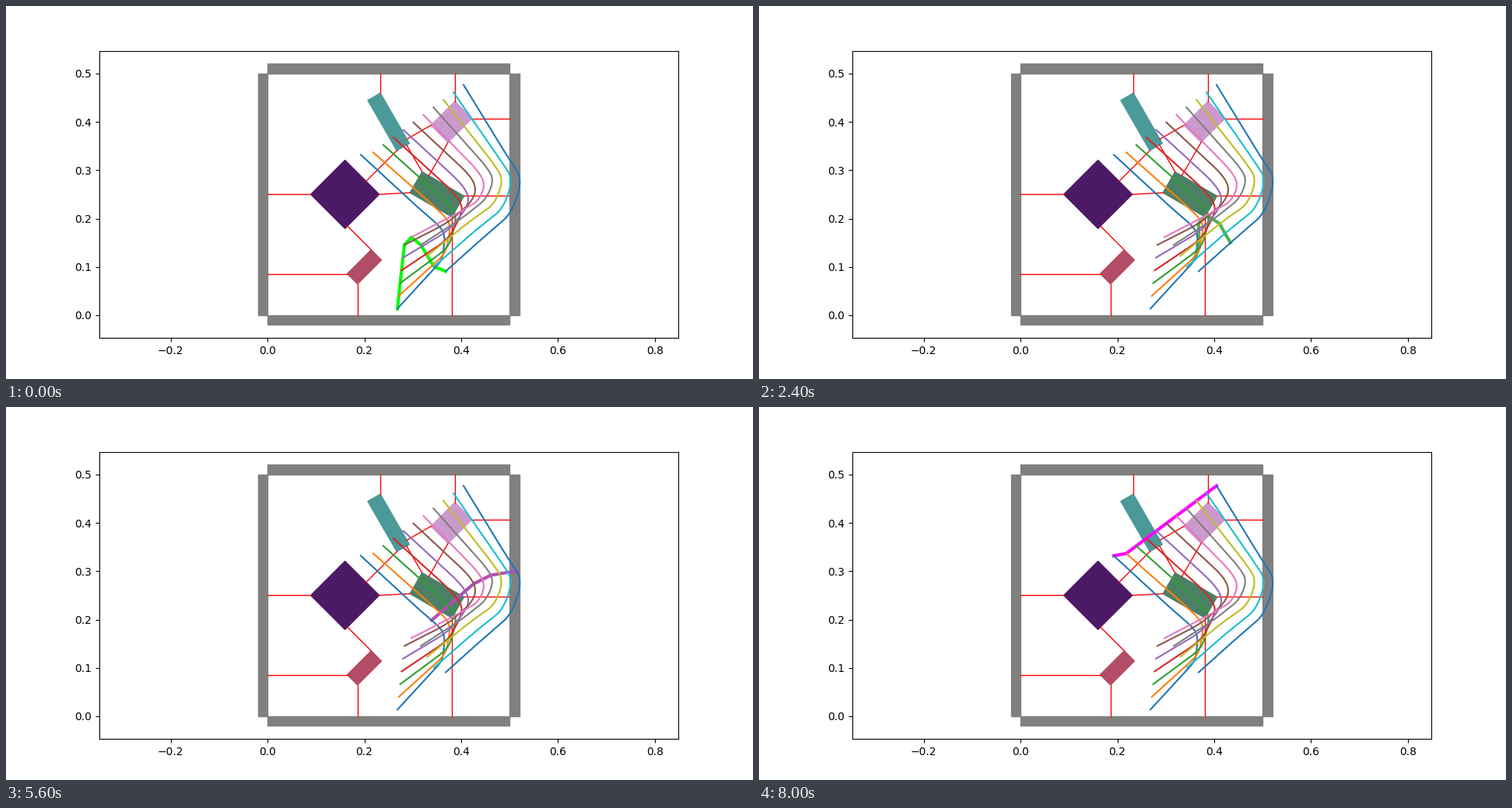
These frames come from a looping animation (960x480 px, 8.2 s). A matplotlib script:

```python
from itertools import product

import numpy as np
import matplotlib.pyplot as plt
from matplotlib.animation import FuncAnimation
from matplotlib.patches import Polygon

FRAMES, INTERVAL = 41, 200
SCALE = 369.6 / 0.594       # pixels per data unit
X0, Y0 = 336.1, 397.5       # pixel position of the data origin
CENTER = (480 + 12 - X0) / SCALE
KNOTS = np.array([0, 0, 0, .2, .4, .5, .6, .7, .8, 1, 1, 1])

# name: centre x, y, width, height, angle, colour
BLOCKS = {
    "top": (0.25, 0.51, 0.5, 0.02, 0, "gray"),
    "bottom": (0.25, -0.01, 0.5, 0.02, 0, "gray"),
    "left": (-0.01, 0.25, 0.02, 0.5, 0, "gray"),
    "right": (0.51, 0.25, 0.02, 0.5, 0, "gray"),
    "purple": (0.16, 0.25, 0.1, 0.1, 45, "#4c1966"),
    "teal": (0.25, 0.4, 0.03, 0.12, 30, "#4c9999"),
    "pink": (0.38, 0.4, 0.07, 0.05, 45, "#cc99cc"),
    "green": (0.35, 0.25, 0.1, 0.05, -30, "#4c8066"),
    "crimson": (0.2, 0.1, 0.07, 0.03, 45, "#b34c66"),
}
NEIGHBOURS = {
    "purple": "left teal green crimson",
    "teal": "top pink green",
    "pink": "top right green",
    "green": "right bottom",
    "crimson": "left bottom",
}


def corners(cx, cy, w, h, angle, _):
    a = np.radians(angle)
    u = np.array([np.cos(a), np.sin(a)]) * w / 2
    v = np.array([-np.sin(a), np.cos(a)]) * h / 2
    return np.array([cx, cy]) + [u + v, v - u, -u - v, u - v]


def shortest_link(a, b):
    """Shortest segment from a corner of one block to an edge of the other."""
    links = []
    for p, q in ((a, b), (b, a)):
        for corner, k in product(p, range(4)):
            start, edge = q[k - 1], q[k] - q[k - 1]
            s = np.clip((corner - start) @ edge / (edge @ edge), 0, 1)
            links.append((corner, start + s * edge))
    return min(links, key=lambda link: np.hypot(*(link[0] - link[1])))


def across(keys):
    """Points for all 11 paths from a few {path index: pixel position}."""
    j, pts = list(keys), np.array(list(keys.values()))
    return np.column_stack([np.interp(np.arange(11), j, c) for c in pts.T])


def control_points():
    """Control polygons, shape (control point, path, xy)."""
    j = np.arange(11)[:, None]
    start = across({0: (503, 389), 5: (512, 307), 6: (521, 297),
                    7: (533, 307), 9: (550, 335), 10: (565, 341)})
    entry = across({0: (561, 326), 2: (569, 310), 5: (567, 279),
                    6: (577, 268), 8: (594, 278), 10: (606, 304)})
    bend = across({0: (564, 297), 5: (597, 253), 7: (617, 248), 10: (650, 266)})
    corner = across({0: (560, 285), 5: (605, 236), 7: (627, 224), 10: (664, 222)})
    leave = across({0: (534, 263), 5: (597, 218), 7: (619, 208), 10: (648, 199)})
    end = across({0: (456, 191), 1: (472, 188), 10: (588, 101)})

    lead = 0.29 + 0.47 * np.maximum(0, 1 - j / 7) ** 2
    tail = 0.57 - 0.02 * j
    px = np.array([start, start + lead * (entry - start), entry,
                   (entry + bend) / 2, bend, corner, leave,
                   end + tail * (leave - end), end])
    return (px - [X0, Y0]) / [SCALE, -SCALE]


def basis(t, degree=2):
    """B-spline basis values, shape (len(t), control points)."""
    t = np.minimum(np.atleast_1d(t), 1 - 1e-9)[:, None]
    b = ((KNOTS[:-1] <= t) & (t < KNOTS[1:])).astype(float)
    for d in range(1, degree + 1):
        n = len(KNOTS) - d - 1
        span = KNOTS[d:] - KNOTS[:-d]
        inv = np.where(span > 0, 1 / np.where(span > 0, span, 1), 0)
        b = ((t - KNOTS[:n]) * inv[:n] * b[:, :n]
             + (KNOTS[d + 1:] - t) * inv[1:] * b[:, 1:])
    return b


CONTROL = control_points()


def paths_at(t):
    return np.einsum("tc,cjk->tjk", basis(t), CONTROL)


fig, ax = plt.subplots(figsize=(9.6, 4.8), dpi=100)
ax.set_xlim(CENTER - 372 / SCALE, CENTER + 372 / SCALE)
ax.set_ylim(-0.047, 0.547)

shapes = {name: corners(*spec) for name, spec in BLOCKS.items()}
for name, shape in shapes.items():
    ax.add_patch(Polygon(shape, color=BLOCKS[name][-1]))
for name, others in NEIGHBOURS.items():
    for other in others.split():
        ax.plot(*np.transpose(shortest_link(shapes[name], shapes[other])),
                color="red", lw=1)

chain, = ax.plot([], [], color="lime", lw=3)
ax.plot(*np.moveaxis(paths_at(np.linspace(0, 1, 160)), 2, 0), lw=1.5)


def update(i):
    t = i / (FRAMES - 1)
    chain.set_data(*paths_at(t)[0].T)
    chain.set_color((t, 1 - t, t))
    return chain,


anim = FuncAnimation(fig, update, frames=FRAMES, interval=INTERVAL,
                     repeat=True, repeat_delay=0)
plt.show()
```
